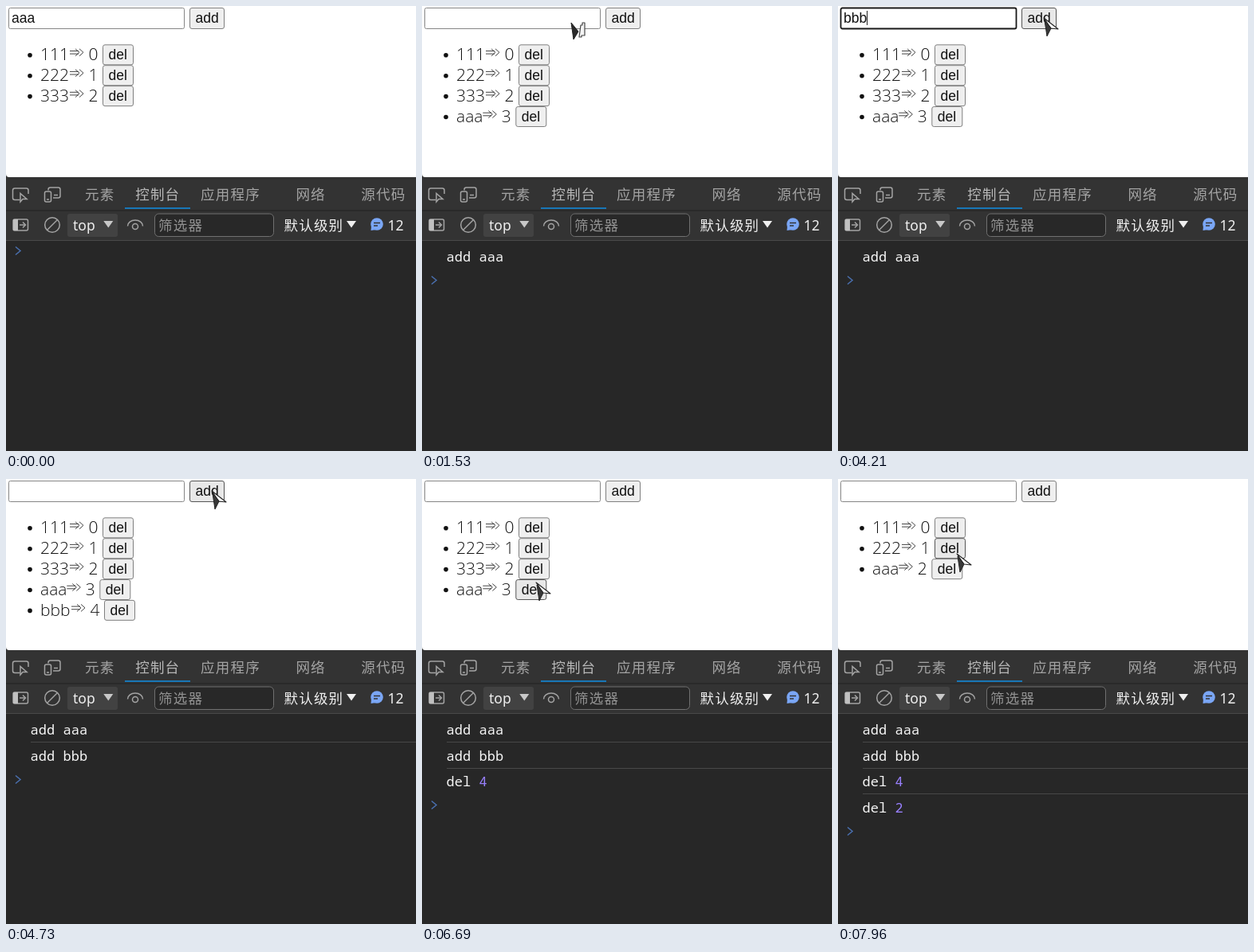
Recreate the animation shown at these times as an HTML page with a canvas. Size 514 px wide and 559 px high, loop 8 s.

```html
<!DOCTYPE html>
<html lang="zh">
<head>
<meta charset="utf-8">
<title>List demo</title>
<style>
html, body { margin: 0; width: 100%; height: 100%; overflow: hidden; background: #272727; }
canvas { display: block; }
</style>
</head>
<body>
<canvas id="stage" width="514" height="559"></canvas>
<script>
const ctx = document.getElementById('stage').getContext('2d');
const W = 514, PAGE_H = 215, BAR_H = 294, LOOP = 8000, STEP = 130;
const UI = '17.5px "Liberation Sans", Arial, sans-serif';
const LIST = '300 21px "Open Sans", "Noto Sans", sans-serif';
const CJK = '17.5px "Noto Sans CJK SC", "Noto Sans CJK", sans-serif';
const BAR = '500 17.5px "Noto Sans", sans-serif';
const MONO = '500 17px "Noto Sans Mono", monospace';
const DIM = '#a4a4a4', LIGHT = '#f0f0f0', BAR_BG = '#333', LOG_BG = '#272727';

const ADD_A = 1000, FOCUS = 1790, TYPE = 2810, KEY = 200, ADD_B = 4610, DEL_B = 5770, DEL_3 = 7080;

const rowY = i => 48.3 + 25.9 * i;
const delSpot = (i, dy = 4) => [142 + dy / 3, rowY(i) + dy];

// Pointer trips: departure, arrival, destination
const TRIPS = [
  [230, 750, [267, 18]],
  [1390, 1530, [186, 19]],
  [2030, 2030, [190, 19]],
  [3840, 4210, [258, 15]],
  [4990, 5650, delSpot(4)],
  [6430, 6690, delSpot(3)],
  [6830, 6960, delSpot(2)],
  [7840, 7960, delSpot(1, 20)]
];

function pointerAt(t) {
  let x = W + 6, y = 190;
  for (const [t0, t1, [tx, ty]] of TRIPS) {
    if (t < t0) break;
    const n = Math.round((t1 - t0) / STEP);
    const done = n ? Math.min(n, Math.floor((t - t0) / (t1 - t0) * n + 1e-6)) : 0;
    const p = (done + 1) / (n + 1);
    x += (tx - x) * p;
    y += (ty - y) * p;
  }
  return { x: Math.round(x), y: Math.round(y) };
}

function text(s, x, y, font, color, spacing = 0) {
  ctx.font = font;
  ctx.fillStyle = color;
  ctx.letterSpacing = spacing + 'px';
  ctx.fillText(s, x, y);
}

const cjk = (s, x, y, color) => text(s, x, y, CJK, color, 1.2);

function rect(x, y, w, h, color) {
  ctx.fillStyle = color;
  ctx.fillRect(x, y, w, h);
}

function paint(fill, stroke, width) {
  if (fill) { ctx.fillStyle = fill; ctx.fill(); }
  if (stroke) { ctx.strokeStyle = stroke; ctx.lineWidth = width; ctx.stroke(); }
}

function box(x, y, w, h, r, fill, stroke, width = 1) {
  ctx.beginPath();
  ctx.roundRect(x, y, w, h, r);
  paint(fill, stroke, width);
}

function poly(pts, fill, stroke, width = 1) {
  ctx.beginPath();
  pts.forEach(([x, y]) => ctx.lineTo(x, y));
  ctx.closePath();
  paint(fill, stroke, width);
}

function line(x1, y1, x2, y2, color, width = 1.5) {
  ctx.beginPath();
  ctx.moveTo(x1, y1);
  ctx.lineTo(x2, y2);
  paint(null, color, width);
}

function disc(x, y, r, fill, stroke) {
  ctx.beginPath();
  ctx.arc(x, y, r, 0, Math.PI * 2);
  paint(fill, stroke, 1.5);
}

// Right-pointing angle with its tip at x, y
function chevron(x, y, w, h, color, width) {
  ctx.beginPath();
  ctx.moveTo(x - w, y - h);
  ctx.lineTo(x, y);
  ctx.lineTo(x - w, y + h);
  paint(null, color, width);
}

const caretDown = (x, y, color) => poly([[x - 6, y], [x + 6, y], [x, y + 8.5]], color);

function button(label, x, y, w, h, p) {
  const hover = p.x >= x && p.x <= x + w && p.y >= y && p.y <= y + h;
  box(x + .5, y + .5, w - 1, h - 1, 2.5, hover ? '#e8e8e8' : '#efefef', hover ? '#555' : '#808080');
  text(label, x + 7.5, y + 19, UI, '#111');
}

function field(t) {
  const focused = t >= FOCUS && t < ADD_B;
  const typed = t < TYPE ? 0 : Math.min(3, 1 + Math.floor((t - TYPE) / KEY));
  const value = t < ADD_A ? 'aaa' : focused ? 'b'.repeat(typed) : '';
  box(3.5, 2.5, 220, 26, 2, '#fff', focused ? '#181818' : '#858585', focused ? 1.8 : 1);
  text(value, 7, 21, UI, '#111');
  const since = typed ? TYPE + KEY * (typed - 1) : FOCUS;
  if (focused && Math.floor((t - since) / 500) % 2 === 0) {
    rect(Math.round(7 + ctx.measureText(value).width), 6, 1, 18, '#222');
  }
}

function item(label, i, p) {
  const y = rowY(i);
  const dx = { aaa: -3.7, bbb: 2 }[label] || 0;
  disc(30, y + 13.5, 2.8, '#111');
  text(label, 43, y + 20, LIST, '#111');
  for (const dy of [-1.8, 1.8]) line(80 + dx, y + 10 + dy, 91 + dx, y + 10 + dy, '#444', 1);
  for (const tip of [92, 97]) chevron(tip + dx, y + 10, 5, 4.5, '#444', 1);
  text(i, 103.5 + dx, y + 20, LIST, '#111');
  button('del', 121 + dx, y, 39, 26, p);
}

function page(t, p) {
  box(0, 0, W, PAGE_H, [0, 0, 0, 4], '#fff');
  field(t);
  button('add', 230, 2, 44, 27, p);
  const items = ['111', '222'];
  if (t < DEL_3) items.push('333');
  if (t >= ADD_A) items.push('aaa');
  if (t >= ADD_B && t < DEL_B) items.push('bbb');
  items.forEach((s, i) => item(s, i, p));
}

function tabs() {
  rect(0, PAGE_H - 6, W, BAR_H - PAGE_H + 6, BAR_BG);
  rect(0, 256, W, 2, '#2a2a2a');
  rect(0, BAR_H, W, 1, '#4a4a4a');

  // Inspect icon
  box(8.5, 229, 19.5, 14.5, 2.5, null, DIM, 1.5);
  rect(17, 236, 13, 9, BAR_BG);
  poly([[18, 235.5], [18, 246], [21, 242.5], [26, 242.5]], BAR_BG, DIM, 1.5);

  // Device icon
  box(53, 228, 15, 13, 2.5, null, DIM, 1.5);
  rect(47, 231.5, 12, 16, BAR_BG);
  box(48.5, 233, 8, 13, 2, null, DIM, 1.5);
  line(60, 237.5, 65, 237.5, DIM);
  line(51, 243, 54, 243, DIM);

  let x = 99;
  ['元素', '控制台', '应用程序', '网络', '源代码'].forEach((s, i) => {
    cjk(s, x, 243, i === 1 ? '#b8b8b8' : DIM);
    x += s.length * 18.7 + (i < 2 ? 25.8 : 44.5);
  });
  rect(149, 253, 82, 2, '#1877b8');
}

function filters() {
  // Sidebar toggle
  box(9, 268, 18.5, 14, 2, null, DIM, 1.5);
  rect(9, 268, 6, 14, '#c0c0c0');
  line(17, 275, 24, 275, DIM);
  chevron(24.5, 275, 3.5, 3.5, DIM, 1.5);

  // Clear
  disc(58, 275, 9.3, null, DIM);
  line(51.5, 281.5, 64.5, 268.5, DIM);

  box(77, 261, 63, 29, 3, '#424242');
  text('top', 84, 282, BAR, '#eee');
  caretDown(128.3, 270, '#c8c8c8');

  // Eye
  disc(162, 277, 3.5, null, DIM);
  ctx.beginPath();
  ctx.ellipse(162, 276.5, 9.5, 7.5, 0, Math.PI, 0);
  paint(null, DIM, 1.5);

  box(186.5, 261, 149, 28.5, 5, '#282828', '#707070');
  cjk('筛选器', 191, 282, '#929292');
  cjk('默认级别', 348.5, 282, LIGHT);
  caretDown(433, 270, LIGHT);

  // Message badge
  disc(465, 274, 7.8, '#7aa6f5');
  poly([[458, 276], [457.5, 282], [464, 281]], '#7aa6f5');
  line(461, 272.5, 469, 272.5, BAR_BG);
  line(461, 276, 466, 276, BAR_BG);
  text('12', 478.5, 282, BAR, LIGHT);
}

function log(t) {
  rect(0, BAR_H + 1, W, 264, LOG_BG);
  const rows = [[ADD_A, 'add', 'aaa'], [ADD_B, 'add', 'bbb'], [DEL_B, 'del', '4'], [DEL_3, 'del', '2']]
    .filter(([at]) => t >= at);
  rows.forEach(([, cmd, arg], i) => {
    const y = Math.round(321 + 32.6 * i);
    text(cmd, 30.5, y, MONO, '#f6f6f6');
    text(arg, 71.5, y, MONO, cmd === 'del' ? '#9980ff' : '#f6f6f6');
    if (i < rows.length - 1) rect(31, y + 9, W - 31, 1, '#484848');
  });
  const y = rows.length ? Math.round(311.5 + 32.6 * rows.length) : 307;
  chevron(18, y + .5, 6, 5, '#4a70b0', 1.5);
}

function pointer({ x, y }) {
  ctx.save();
  ctx.translate(x, y);
  ctx.lineJoin = 'round';
  if (x < 224 && y < 29) {
    // Text beam caught halfway to an arrow
    poly([[1, 2], [10, 13], [4, 23]], '#2a2a2a', '#222');
    poly([[13, 5], [15, 5], [15, 2], [18, 2], [18, 18], [14, 18], [14, 20], [11, 20]], '#f4f4f4', '#444', 1.2);
  } else {
    poly([[0, 0], [18, 14], [9, 13]], '#fff', '#222', 1.1);
    poly([[1, 3], [9, 13], [4, 23]], '#383838', '#222');
  }
  ctx.restore();
}

function draw(t) {
  const p = pointerAt(t);
  tabs();
  rect(0, PAGE_H - 6, W, 6, BAR_BG);
  page(t, p);
  filters();
  log(t);
  if (t >= TRIPS[0][0]) pointer(p);
}

const begin = performance.now();
function tick() {
  draw((performance.now() - begin) % LOOP);
  requestAnimationFrame(tick);
}
tick();
</script>
</body>
</html>
```
